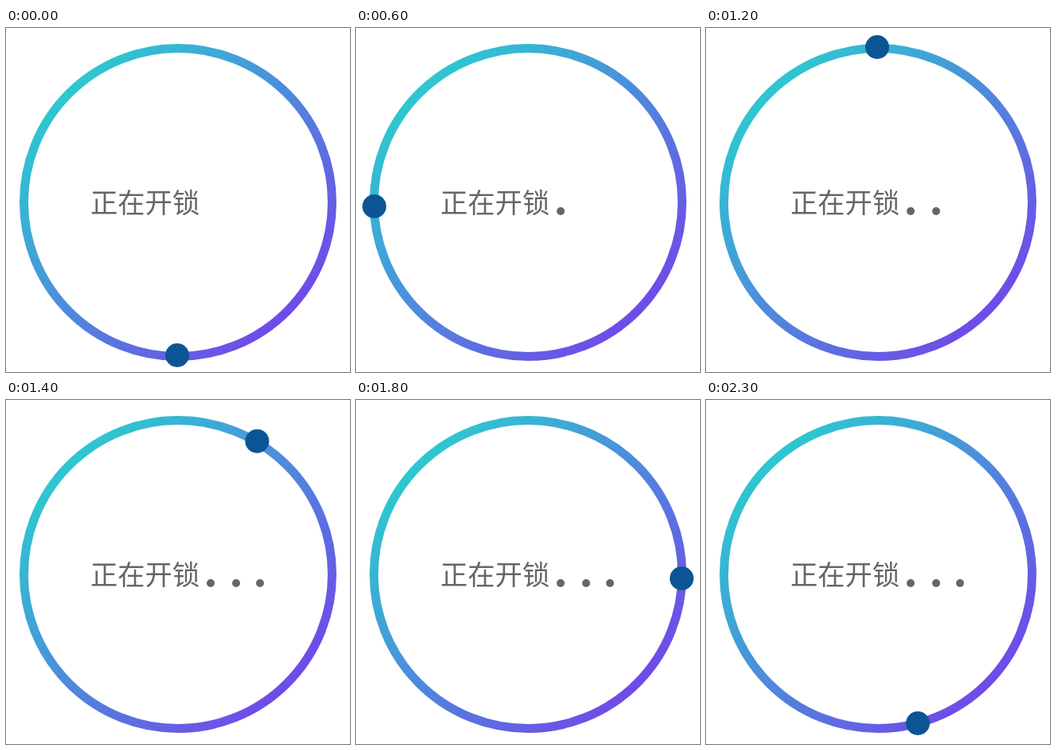
Write an HTML page that moves like this. It is 432 px wide and 432 px high and loops after 2400 ms.

```html
<!DOCTYPE html>
<html lang="zh-CN">
<head>
<meta charset="utf-8">
<title>正在开锁</title>
<style>
  html, body { margin: 0; width: 100%; height: 100%; overflow: hidden; background: #fff; }
  svg { display: block; width: 100%; height: 100%; }
  text { font: 300 34.3px "Noto Sans CJK SC", "Noto Sans CJK", "Noto Sans SC", sans-serif; }
</style>
</head>
<body>
<svg viewBox="0 0 432 432">
  <defs>
    <linearGradient id="ringColor" gradientUnits="userSpaceOnUse" x1="79" y1="82" x2="353" y2="356">
      <stop offset="0" stop-color="#2ec6d0"/>
      <stop offset="1" stop-color="#6f4ce8"/>
    </linearGradient>
  </defs>
  <circle cx="216" cy="219" r="193.5" fill="none" stroke="url(#ringColor)" stroke-width="11"/>
  <g fill="#666">
    <text x="106" y="232.4">正在开锁</text>
    <circle class="dot" cx="257" cy="230" r="5"/>
    <circle class="dot" cx="289" cy="230" r="5"/>
    <circle class="dot" cx="319" cy="230" r="5"/>
  </g>
  <circle id="runner" r="15" fill="#0c5595"/>
</svg>
<script>
  const STEP = 100, STEPS = 24, CX = 216, CY = 219;
  const DOT_STARTS = [1, 7, 13];
  const runner = document.getElementById('runner');
  const dots = document.querySelectorAll('.dot');

  // Step, x and y of the points the runner passes through.
  const stops = [
    [0, 215, 411], [4, 55, 327], [6, 23, 224], [8, 44, 129], [12, 215, 24],
    [16, 387, 127], [18, 409, 224], [23, 266, 406], [24, 215, 411]
  ].map(([step, x, y]) => ({
    step,
    angle: Math.atan2(CX - x, y - CY),
    radius: Math.hypot(x - CX, y - CY)
  }));

  // Keep the clockwise angle growing along the lap.
  for (let i = 1; i < stops.length; i++) {
    while (stops[i].angle < stops[i - 1].angle) stops[i].angle += 2 * Math.PI;
  }

  const mix = (a, b, p) => a + (b - a) * p;

  function draw(time) {
    const step = Math.floor(time / STEP) % STEPS;
    const next = stops.findIndex(s => s.step > step);
    const a = stops[next - 1], b = stops[next];
    const p = (step - a.step) / (b.step - a.step);
    const angle = mix(a.angle, b.angle, p);
    const radius = mix(a.radius, b.radius, p);
    runner.setAttribute('cx', CX - radius * Math.sin(angle));
    runner.setAttribute('cy', CY + radius * Math.cos(angle));
    dots.forEach((dot, i) => {
      dot.setAttribute('visibility', step >= DOT_STARTS[i] ? 'visible' : 'hidden');
    });
  }

  const start = performance.now();
  function tick() {
    draw(performance.now() - start);
    requestAnimationFrame(tick);
  }
  tick();
</script>
</body>
</html>
```
